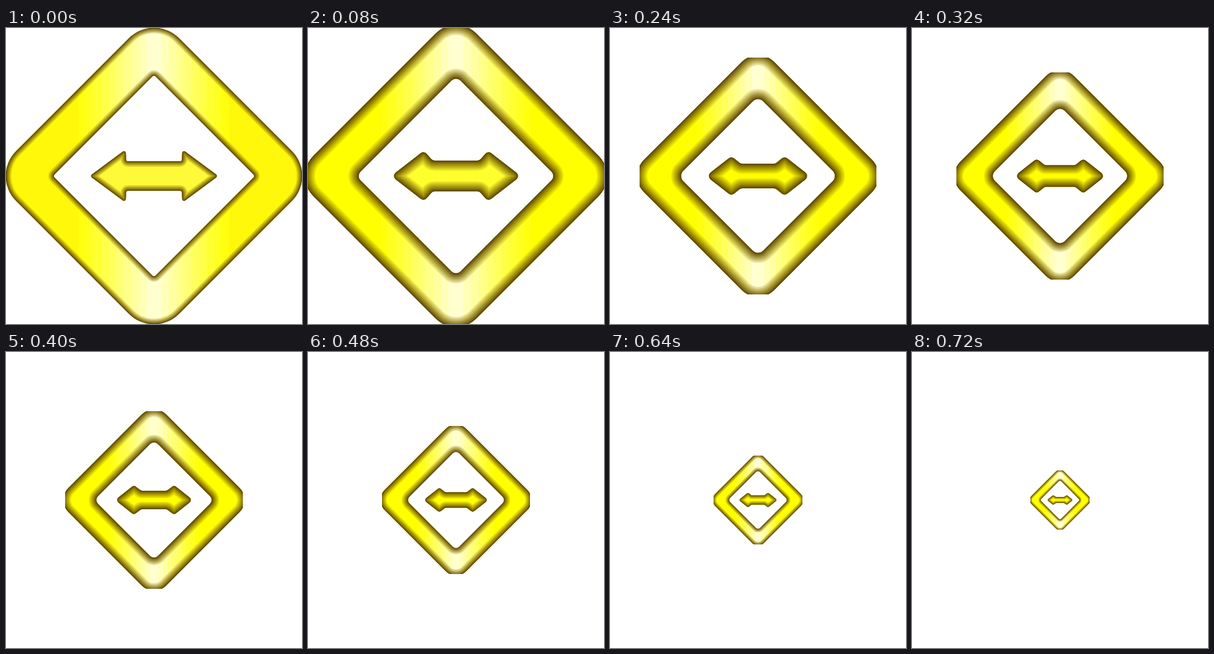
Animation, 480 px wide and 480 px high, one loop 0.76 s. Source, as an HTML page with a canvas:

```html
<!DOCTYPE html>
<html>
<head>
<meta charset="utf-8">
<style>
html, body { margin: 0; width: 100%; height: 100%; overflow: hidden; background: #fff; }
canvas { display: block; width: 480px; height: 480px; }
</style>
</head>
<body>
<canvas id="stage" width="480" height="480"></canvas>
<script>
const ctx = document.getElementById('stage').getContext('2d');
const STEP = 40, STEPS = 19, LAYERS = 12;

// The bevel softens over the first steps, then only the size changes.
const looks = [
  { bevel: 9, outer: 57, hole: 164, holeR: 4, base: 10, arrow: 56, tip: 104, top: [46, 43], notch: [45, 24], r: 3 },
  { bevel: 12, outer: 52, hole: 163, holeR: 7, base: 4, arrow: 52, tip: 104, top: [50, 42], notch: [42, 25], r: 5 },
  { bevel: 16, outer: 46, hole: 162, holeR: 10, base: 0, arrow: 46, tip: 105, top: [52, 41], notch: [38, 25], r: 7 },
  { bevel: 18, outer: 46, hole: 162, holeR: 13, base: 0, arrow: 20, tip: 105, top: [53, 41], notch: [36, 25], r: 8 },
  { bevel: 20, outer: 46, hole: 162, holeR: 15, base: 0, arrow: 0, tip: 105, top: [54, 40], notch: [35, 25], r: 9 }
];

function rounded(path, pts, r) {
  const n = pts.length, [a, b] = [pts[n - 1], pts[0]];
  path.moveTo((a[0] + b[0]) / 2, (a[1] + b[1]) / 2);
  pts.forEach((p, i) => {
    const q = pts[(i + 1) % n];
    path.arcTo(p[0], p[1], (p[0] + q[0]) / 2, (p[1] + q[1]) / 2, r);
  });
  path.closePath();
}

const diamond = d => [[0, -d], [d, 0], [0, d], [-d, 0]];

function arrowPoints({ tip, top: [tx, ty], notch: [nx, ny] }) {
  return [[-tip, 0], [-tx, -ty], [-nx, -ny], [nx, -ny], [tx, -ty],
          [tip, 0], [tx, ty], [nx, ny], [-nx, ny], [-tx, ty]];
}

// Banded highlight, palest on the vertical axis.
function sheen(base) {
  const g = ctx.createLinearGradient(-122, 0, 122, 0), bands = 20;
  const yellow = `rgb(255,${base ? 248 : 255},${base})`;
  g.addColorStop(0, yellow);
  for (let i = 0; i < bands; i++) {
    const k = Math.min(i, bands - 1 - i) + 1;
    const c = `rgb(255,255,${Math.round(208 * Math.pow(k / 10, 1.15))})`;
    g.addColorStop(i / bands, c);
    g.addColorStop((i + 1) / bands, c);
  }
  g.addColorStop(1, yellow);
  return g;
}

// Fill a shape, then darken it towards its edge with ever wider strokes.
function emboss(path, fill, bevel) {
  ctx.save();
  ctx.clip(path, 'evenodd');
  ctx.fillStyle = fill;
  ctx.fillRect(-240, -240, 480, 480);
  ctx.globalCompositeOperation = 'multiply';
  ctx.strokeStyle = 'rgb(229,223,190)';
  ctx.lineJoin = 'round';
  for (let i = 1; i <= LAYERS; i++) {
    ctx.lineWidth = 2 * bevel * Math.pow(i / LAYERS, 2.2);
    ctx.stroke(path);
  }
  ctx.restore();
}

function draw(n) {
  const look = looks[Math.min(n, looks.length - 1)];
  const size = 1 - Math.max(0, n - 2) * .05;
  ctx.setTransform(1, 0, 0, 1, 0, 0);
  ctx.fillStyle = '#fff';
  ctx.fillRect(0, 0, 480, 480);
  ctx.save();
  ctx.translate(240, 240);
  ctx.scale(size, size);
  ctx.beginPath();
  ctx.rect(-240, -240, 480, 480);
  ctx.clip();

  const ring = new Path2D();
  rounded(ring, diamond(264), look.outer);
  rounded(ring, diamond(look.hole), look.holeR);
  emboss(ring, sheen(look.base), look.bevel);

  const arrow = new Path2D();
  rounded(arrow, arrowPoints(look), look.r);
  emboss(arrow, `rgb(255,${look.base ? 250 : 255},${look.arrow})`, look.bevel);
  ctx.restore();
}

let last = -1;
const start = performance.now();
function tick() {
  const n = Math.floor((performance.now() - start) / STEP) % STEPS;
  if (n !== last) draw(last = n);
  requestAnimationFrame(tick);
}
tick();
</script>
</body>
</html>
```
